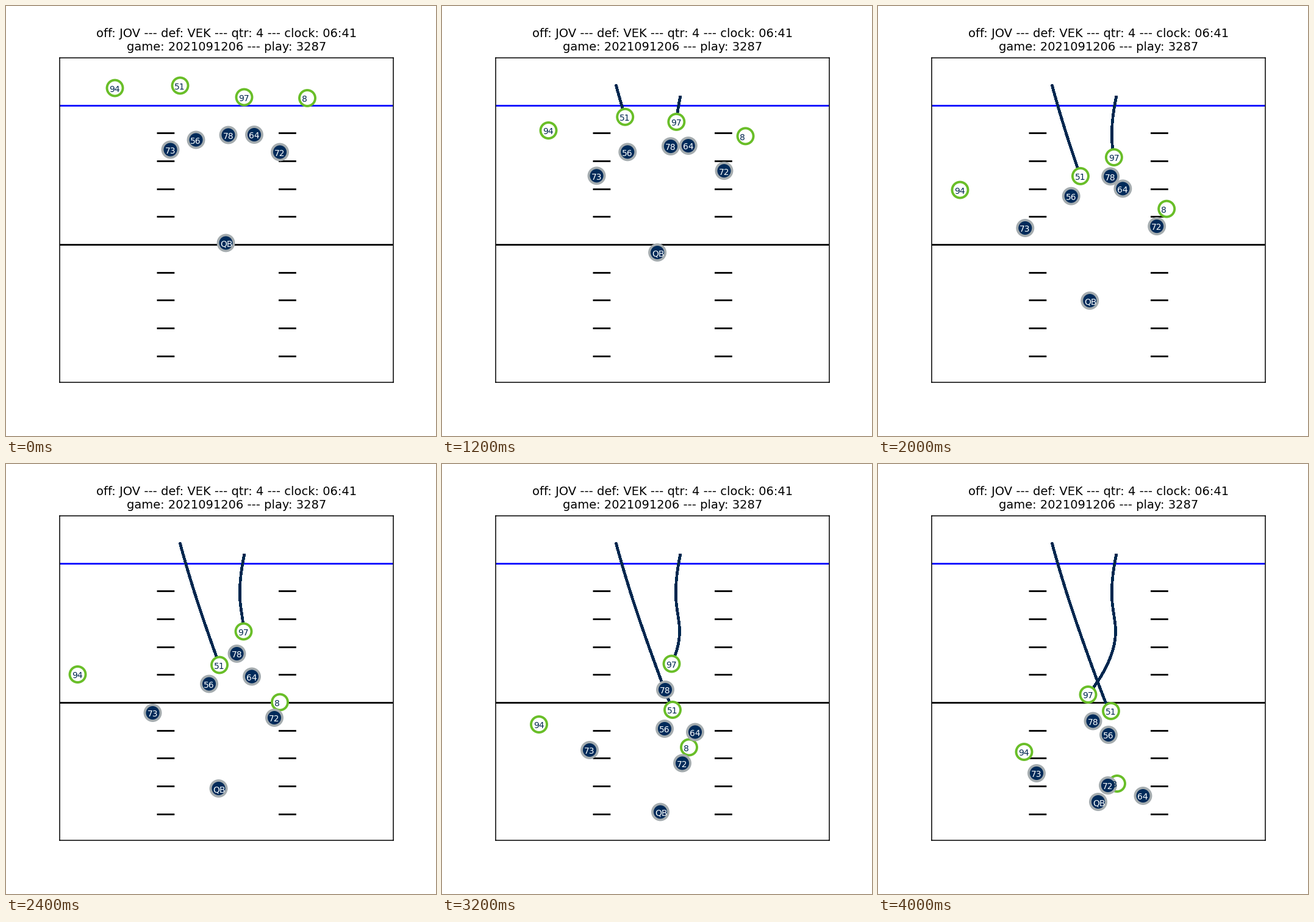
Recreate the animation shown at these times as a matplotlib script. Size 705 by 705 pixels, loop 4.1 s.

```python
import matplotlib.pyplot as plt
import numpy as np
from matplotlib.animation import FuncAnimation
from matplotlib.patches import Circle

SIZE, DPI = 705, 100
FRAMES, INTERVAL = 41, 100
NAVY, GRAY = "#002b5a", "#a5acaf"
DEEP, GREEN = "#00274f", "#69be28"
OFFENSE = dict(fill=NAVY, edge=GRAY, text="white")
DEFENSE = dict(fill="white", edge=GREEN, text=DEEP)
TRAILED = ("51", "97")

# Each route: the stance, then a point at every key tick (x + yj in pixels)
SNAP = 3
KEY_TICKS = np.arange(16, FRAMES, 8)
RUSHERS = {
    "94": [178.5+134.5j, 160+255j, 117.5+345j, 159+427j, 239.5+472j],
    "51": [285.5+130.5j, 314.5+227.5j, 350+329.5j, 378+403j, 382+405j],
    "97": [390.5+149.5j, 383.5+220j, 389.5+274.5j, 376.5+327.5j, 344.5+378j],
    "8": [494+151j, 491+269.5j, 449+390.5j, 405+464.5j, 392+524j],
}
BLOCKERS = {
    "73": [269.5+235.5j, 245+318j, 240.5+408j, 242+469j, 260+507j],
    "56": [311.5+219.5j, 306+268j, 333+360.5j, 365+434j, 378+444j],
    "78": [364.5+211.5j, 380+251j, 378.5+311j, 366+370j, 352.5+421.5j],
    "64": [407+211j, 402+256.5j, 403+348.5j, 415+439.5j, 434.5+544j],
    "72": [449+239.5j, 465+308j, 440+416j, 394+490.5j, 377+527j],
    "QB": [360.5+388.5j, 349+434j, 348.5+532j, 358+570.5j, 361+554j],
}


def spline_basis(t):
    """Cubic spline terms that leave the stance with zero speed."""
    def since(start):
        return np.maximum(t - start, 0.0)
    return np.stack([since(SNAP) ** 2, since(SNAP) ** 3,
                     *(since(k) ** 3 for k in KEY_TICKS[:2])], axis=1)


def route(points):
    stance, keys = points[0], np.array(points[1:])
    weights = np.linalg.solve(spline_basis(KEY_TICKS), keys - stance)
    return stance + spline_basis(np.arange(FRAMES)) @ weights


class Player:
    def __init__(self, ax, name, points, style, z):
        self.path = route(points)
        self.dot = Circle((0, 0), 13, fc=style["fill"], ec=style["edge"],
                          lw=2.8, zorder=z)
        ax.add_patch(self.dot)
        self.label = ax.text(0, 0, name, color=style["text"], fontsize=10,
                             ha="left", va="baseline", zorder=50)
        self.trail = None
        if name in TRAILED:
            self.trail, = ax.plot([], [], color=DEEP, lw=2.6, zorder=4,
                                  antialiased=False)

    def move(self, i):
        x, y = self.path[i].real, self.path[i].imag
        self.dot.center = x, y
        self.label.set_position((x - 9.1, y + 6.4))
        if self.trail:
            walked = self.path[:i + 1]
            self.trail.set_data(walked.real, walked.imag)


def stroke(ax, x0, x1, y, color="black"):
    ax.plot([x0, x1], [y, y], color=color, lw=2, solid_capstyle="butt",
            snap=False, zorder=2)


def draw_field(ax):
    left, right = ax.get_xlim()
    for yard in range(10):
        y = int(163.25 + 45.67 * yard) + 0.5
        if yard % 5 == 0:
            stroke(ax, left, right, y, "black" if yard else "blue")
        else:
            for x in (247.5, 447):
                stroke(ax, x, x + 28.8, y)


plt.rcParams["font.family"] = "DejaVu Sans"
fig = plt.figure(figsize=(SIZE / DPI, SIZE / DPI), dpi=DPI, facecolor="white")
ax = fig.add_axes([0.125, 0.125, 0.775, 0.755])
ax.set(xlim=(0.125 * SIZE, 0.9 * SIZE), ylim=(0.875 * SIZE, 0.12 * SIZE),
       xticks=[], yticks=[])
for spine in ax.spines.values():
    spine.set_linewidth(1.1)
ax.set_title("off: JOV --- def: VEK --- qtr: 4 --- clock: 06:41\n"
             "game: 2021091206 --- play: 3287", fontsize=14, pad=8)
draw_field(ax)

players = []
for squad, style in ((RUSHERS, DEFENSE), (BLOCKERS, OFFENSE)):
    for name, points in squad.items():
        players.append(Player(ax, name, points, style, 5 + len(players)))


def update(i):
    for p in players:
        p.move(i)
    return []


anim = FuncAnimation(fig, update, frames=FRAMES, interval=INTERVAL,
                     repeat=True, repeat_delay=0)
plt.show()
```
